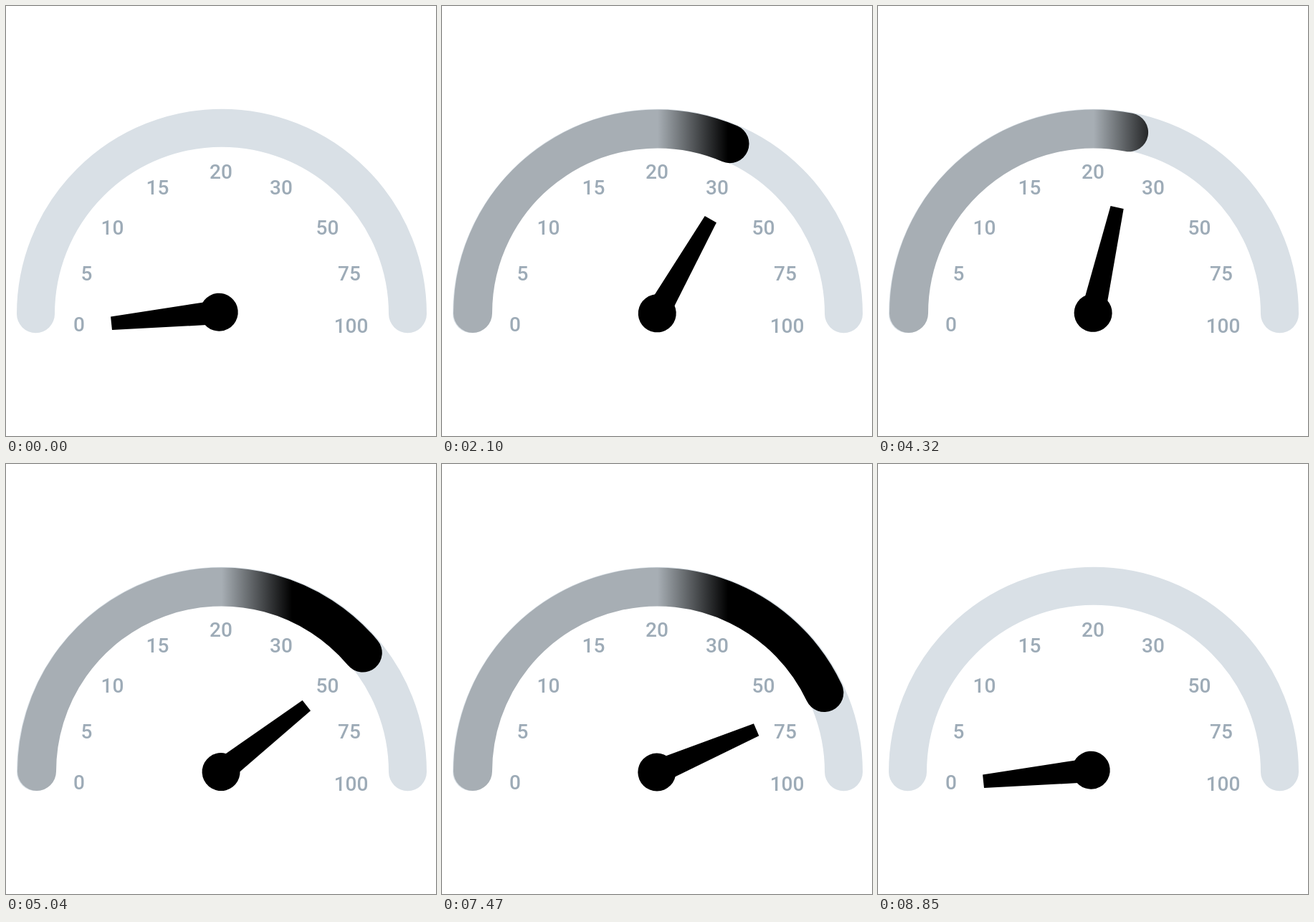
These frames come from a looping animation (600x600 px, 9 s). An HTML page:

```html
<!DOCTYPE html>
<html lang="en">
<head>
<meta charset="utf-8">
<title>Gauge</title>
<style>
  html, body { margin: 0; width: 100%; height: 100%; overflow: hidden; background: #fff; }
  svg { display: block; width: 100%; height: 100%; }
  text { font: 500 28px Roboto, "Liberation Sans", sans-serif; fill: #9dabb7; text-anchor: middle; }
  .arc { fill: none; stroke-linecap: round; }
</style>
</head>
<body>
<svg viewBox="0 0 600 600">
  <defs>
    <linearGradient id="fade" gradientUnits="userSpaceOnUse" x1="301" y1="0" x2="399" y2="0">
      <stop offset="0" stop-color="#a7aeb4"/>
      <stop offset="1" stop-color="#000"/>
    </linearGradient>
  </defs>
  <path class="arc" d="M41.5 429.7A259.5 259.5 0 0 1 560.5 429.7" stroke="#d9e0e6" stroke-width="53"/>
  <path class="arc" id="progress" stroke="url(#fade)" stroke-width="54"/>
  <g id="labels"></g>
  <g id="needle">
    <g transform="translate(-.9 -1.7)">
      <path d="M-151 -9.3L-15 -16.2V16.2L-151 9.3Z"/>
      <circle r="26.5"/>
    </g>
  </g>
</svg>
<script>
  const LOOP = 9000;
  const center = { x: 300.5, y: 429, r: 257.5 };

  // time in ms, arc sweep in degrees, needle angle in degrees
  const keys = [
    [0, 0, -5.9],
    [2070, 113.4, 120],
    [2790, 106, 110.7],
    [3600, 124.1, 128.7],
    [4170, 93, 94.6],
    [5410, 160, 162.4],
    [5975, 149.3, 151.2],
    [8375, 158, 160.3],
    [8845, 0, -5.9],
    [LOOP, 0, -5.9]
  ];

  const labels = [
    ["0", 102, 453.5], ["5", 112.5, 383], ["10", 148.5, 319],
    ["15", 211.5, 263], ["20", 300, 241], ["30", 384, 263],
    ["50", 448.5, 319], ["75", 479, 383], ["100", 481.5, 456]
  ];

  const byId = id => document.getElementById(id);
  const progress = byId("progress");
  const needle = byId("needle");

  byId("labels").innerHTML = labels
    .map(([text, x, y]) => `<text x="${x}" y="${y}">${text}</text>`)
    .join("");

  function poseAt(time) {
    const i = keys.findIndex(key => time < key[0]);
    const [t0, arc0, needle0] = keys[i - 1];
    const [t1, arc1, needle1] = keys[i];
    const k = (time - t0) / (t1 - t0);
    return [arc0 + (arc1 - arc0) * k, needle0 + (needle1 - needle0) * k];
  }

  function arcPath(degrees) {
    if (degrees < 0.01) return "";
    const { x, y, r } = center;
    const a = degrees * Math.PI / 180;
    return `M${x - r} ${y}A${r} ${r} 0 0 1 ${x - r * Math.cos(a)} ${y - r * Math.sin(a)}`;
  }

  function draw(time) {
    const [sweep, angle] = poseAt(time % LOOP);
    progress.setAttribute("d", arcPath(sweep));
    needle.setAttribute("transform", `translate(298.3 428.8) rotate(${angle})`);
  }

  let start;
  function tick(now) {
    start ??= now;
    draw(Math.max(0, now - start));
    requestAnimationFrame(tick);
  }

  draw(0);
  requestAnimationFrame(tick);
</script>
</body>
</html>
```
